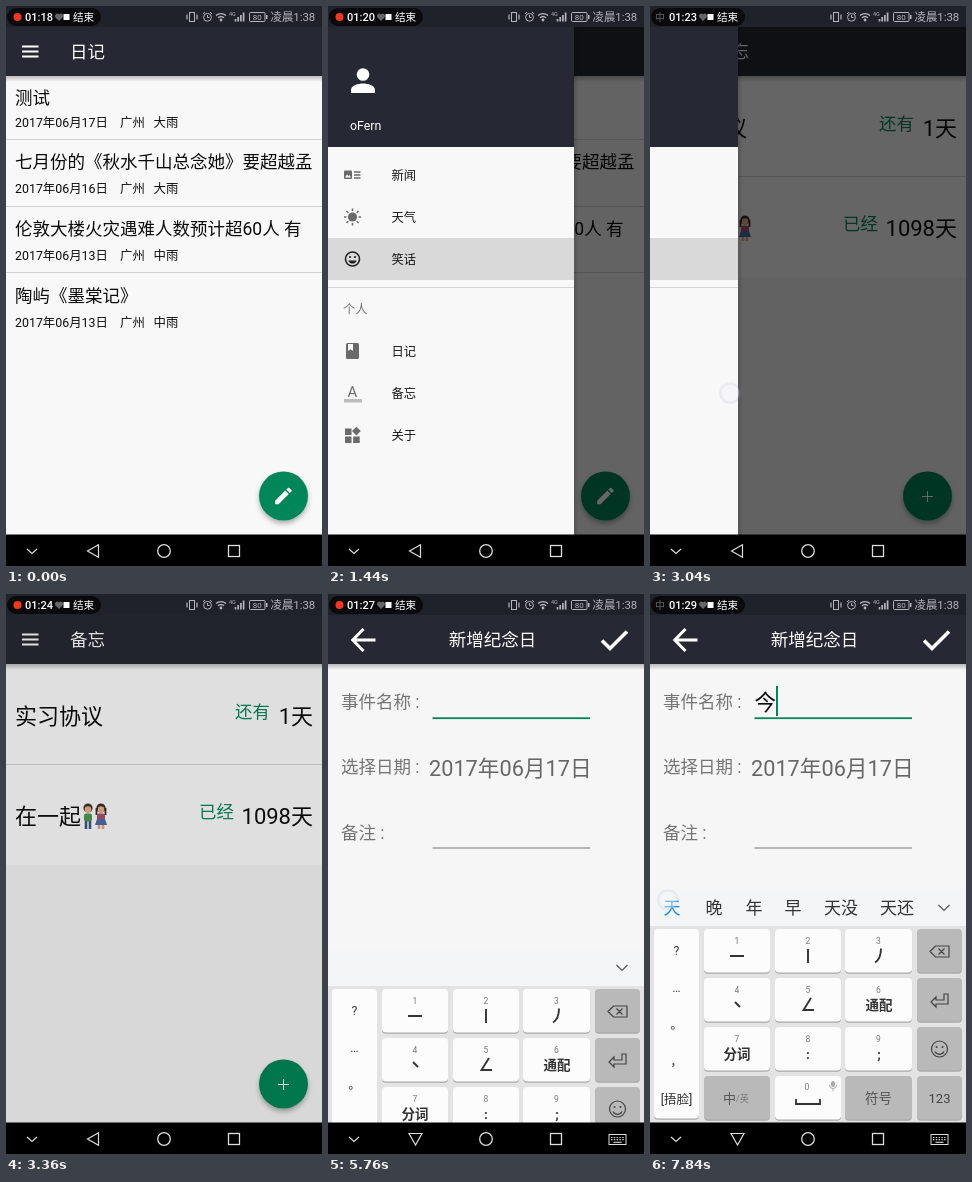
An HTML page for the animation above (8 s loop, 316 px wide and 560 px high).

```html
<!DOCTYPE html>
<html lang="zh-CN">
<head>
<meta charset="utf-8">
<title>日记</title>
<style>
html, body { margin: 0; width: 100%; height: 100%; overflow: hidden; background: #000; }
svg { display: block; width: 316px; height: 560px; }
text { font-family: Roboto, "Noto Sans CJK SC", "Noto Sans CJK", sans-serif; white-space: pre; }
</style>
</head>
<body>
<svg id="stage" viewBox="0 0 316 560" xmlns="http://www.w3.org/2000/svg"></svg>
<script>
const LOOP = 8000, STEP = 160;
const DARK = '#262833', GREEN = '#008659', GREY = '#757575', INK = '#0c0c0c';
const MEDIUM = 'font-weight="500"';

// ---- markup helpers; text y is the middle of the line ----
const text = (x, y, size, str, fill = INK, anchor = 'start', more = '') =>
  `<text x="${x}" y="${y + size * 0.37}" font-size="${size}" fill="${fill}" text-anchor="${anchor}" ${more}>${str}</text>`;
const mid = (x, y, size, str, fill, more) => text(x, y, size, str, fill, 'middle', more);
const rect = (x, y, w, h, fill, more = '') =>
  `<rect x="${x}" y="${y}" width="${w}" height="${h}" fill="${fill}" ${more}/>`;
const disc = (x, y, r, fill, more = '') => `<circle cx="${x}" cy="${y}" r="${r}" fill="${fill}" ${more}/>`;
const line = (d, color, width = 1, more = '') =>
  `<path d="${d}" fill="none" stroke="${color}" stroke-width="${width}" ${more}/>`;
const shape = (d, fill, more = '') => `<path d="${d}" fill="${fill}" ${more}/>`;
const group = (id, body, more = '') => `<g id="${id}" ${more}>${body}</g>`;

const bar = (title, x, anchor) =>
  rect(0, 70, 316, 6, 'url(#fall)') + rect(0, 21, 316, 49, DARK) + text(x, 46, 17.5, title, '#fff', anchor, MEDIUM);
const burger = line('M16 40.5H32.5M16 45.5H32.5M16 50.5H32.5', '#fff', 1.9);
const fab = icon => disc(277.5, 490, 24.5, GREEN, 'filter="url(#lift)"') + icon;
const PEN = 'M3 17.25V21h3.75L17.81 9.94l-3.75-3.75L3 17.25zM20.71 7.04c.39-.39.39-1.02 0-1.41l-2.34-2.34c-.39-.39-1.02-.39-1.41 0l-1.83 1.83 3.75 3.75 1.83-1.83z';

// ---- pages ----
function diary() {
  const rows = [
    ['测试', 91.5, '17', '大雨'],
    ['七月份的《秋水千山总念她》要超越孟', 156, '16', '大雨'],
    ['伦敦大楼火灾遇难人数预计超60人 有', 222.7, '13', '中雨'],
    ['陶屿《墨棠记》', 289.4, '13', '中雨']
  ];
  return rect(0, 21, 316, 508, '#f8f8f8') + rows.map(([title, top, day, sky], i) => {
    const y = 116 + i * 66.7;
    return text(9, top, 17.5, title) +
      text(9, y, 12.4, `2017年06月${day}日`) + text(114, y, 12.4, '广州') + text(147.5, y, 12.4, sky) +
      (i < 3 ? rect(0, Math.round(y + 17), 316, 1, '#d2d2d2') : '');
  }).join('') + bar('日记', 64) + burger +
    fab(shape(PEN, '#fff', 'transform="translate(266.4 478.9) scale(.92)"'));
}

function couple() {
  const one = (x, hair, top, legs) =>
    disc(x, 214, 4.6, hair) + disc(x, 215.5, 3.3, '#e8b48c') + rect(x - 4, 219.5, 8, 8, top, 'rx="2"') +
    line(`M${x - 2} 227V235M${x + 2} 227V235`, legs, 2.6);
  return one(82, '#4a3226', '#4f9a55', '#3c5a86') + one(95, '#3a2a26', '#b0506a', '#e0aa88') +
    shape('M91 225H99L101 231H89Z', '#4c6ea8') + line('M90.5 214V221M99.5 214V221', '#3a2a26', 1.8);
}

const memo = () =>
  rect(0, 21, 316, 508, '#f6f6f6') + rect(0, 70, 316, 201, '#fefefe') + rect(0, 170, 316, 1, '#d8d8d8') +
  text(9, 122, 22, '实习协议') + text(229, 118, 17.4, '还有', GREEN) + text(307, 122, 22, '1天', INK, 'end') +
  text(9, 222, 22, '在一起') + couple() + text(193, 218, 17.4, '已经', GREEN) + text(307, 222, 22, '1098天', INK, 'end') +
  bar('备忘', 64) + burger + fab(line('M272 490.5H283M277.5 485V496', '#fff', 1));

function drawer() {
  const G = '#6a6a6a';
  const icons = [
    rect(16, 164.5, 8, 8.5, G, 'rx="1"') + shape('M17 171.5L19 168.5L20.5 170L21.5 169L23 171.5Z', '#f8f8f8') +
      line('M26 166H32.5M26 169H32.5M26 172H32.5', G, 1.7),
    disc(24.5, 211, 4.6, G) + line('M24.5 202.5V205M24.5 217V219.5M16 211H18.5M30.5 211H33M18.5 205L20.2 206.7M28.8 215.3L30.5 217M30.5 205L28.8 206.7M20.2 215.3L18.5 217', G, 1.6),
    disc(24.5, 253, 7, 'none', 'stroke="#222" stroke-width="1.6"') + disc(22, 251, 1.1, '#222') + disc(27, 251, 1.1, '#222') +
      shape('M20.3 254.5H28.7A4.4 4.4 0 0 1 20.3 254.5Z', '#222'),
    rect(18, 337, 13, 16, G, 'rx="1.5"') + shape('M20 338H25V345L22.5 343.3L20 345Z', '#f8f8f8'),
    mid(24.5, 385, 15, 'A', G) + rect(16, 393, 18, 3.5, '#bdbdbd'),
    rect(17, 422.5, 6.5, 6.5, G) + rect(17, 430.5, 6.5, 6.5, G) + rect(25.2, 430.5, 6.5, 6.5, G) +
      rect(25.3, 422, 6.2, 6.2, G, 'transform="rotate(45 28.4 425.1)"')
  ];
  const items = [['新闻', 169], ['天气', 211], ['笑话', 253], ['日记', 345], ['备忘', 387], ['关于', 429]];
  return rect(246, 21, 5, 508, 'url(#side)') + rect(0, 21, 246, 508, '#f8f8f8') + rect(0, 21, 246, 120, DARK) +
    disc(35, 68.5, 6.3, '#fff') + shape('M23 87V84C23 79.5 30 77.5 35 77.5S47 79.5 47 84V87Z', '#fff') +
    text(22, 119, 12.4, 'oFern', '#fff') +
    rect(0, 232, 246, 42, '#d9d9d9') + rect(0, 281, 246, 1, '#d4d4d4') + text(15, 303, 12.3, '个人', GREY) +
    items.map(([name, y], i) => icons[i] + text(63.5, y, 12.3, name, '#151515', 'start', MEDIUM)).join('');
}

const form = () =>
  rect(0, 21, 316, 508, '#f6f6f6') + bar('新增纪念日', 164.5, 'middle') +
  line('M47.5 46H26M35.5 35L24.8 46L35.5 57', '#fff', 3) +
  line('M274 46.5L282 54.5L299 37.5', '#fff', 3.6) +
  text(13, 108, 17.5, '事件名称 :', GREY) + text(13, 173, 17.5, '选择日期 :', GREY) + text(13, 239, 17.5, '备注 :', GREY) +
  text(101, 174, 21.7, '2017年06月17日', '#666') +
  rect(104.5, 123.3, 157.5, 1.8, GREEN) + rect(104.5, 253.5, 157.5, 1, '#777') +
  group('typed', text(104.5, 108, 21.5, '今')) + group('caret', rect(0, 92, 2, 30, GREEN));

// ---- keyboard ----
const COLS = [[54, 66], [125, 66], [195, 67], [267, 45]], ROWS = [335, 384, 433, 482];
function keys() {
  const cap = (x, y, w, h, fill) =>
    rect(x, y + 1.3, w, h, '#a9a9a9', 'rx="4"') + rect(x, y, w, h, fill, 'rx="4"');
  const K = '#333', LIGHT = '#fcfcfc', SOFT = '#b9b9b9';
  let out = rect(0, 296, 316, 36, '#f4f5f7') + rect(0, 332, 316, 197, '#e3e3e4') + cap(4, 335, 45, 189.5, LIGHT);
  [['?', 356], ['…', 393], ['。', 430], ['，', 467], ['[捂脸]', 505]].forEach(([s, y]) => out += mid(26.5, y, 12.5, s, K));
  ROWS.forEach((y, r) => COLS.forEach(([x, w], c) => {
    const soft = c === 3 || (r === 3 && c !== 1);
    out += cap(x, y, w, 43.5, soft ? SOFT : LIGHT);
    if (c < 3 && r < 3) out += mid(x + w / 2, y + 11.5, 8.5, r * 3 + c + 1, '#777');
  }));
  const word = (x, y, s) => mid(x, y, 13.5, s, K, 'font-weight="700"');
  out += line('M80 362H94M158 355V369M231 354.5C231 361 229 366 225 368.5M85 408L90 413M161 404L153.5 416H164', K, 1.9) +
    word(229, 411, '通配') + word(87, 460, '分词') + word(158, 460, ':') + word(229, 460, ';') +
    text(73, 504, 13, '中', '#555') + text(86, 505, 9, '/英', '#777') +
    mid(157, 492.5, 8.5, '0', '#777') + line('M146 505V510H170V505', K, 1.8) +
    rect(181, 487, 4, 6, '#aaa', 'rx="2"') + line('M179.5 491A3.5 3.5 0 0 0 186.5 491M183 494.5V497', '#aaa') +
    mid(228.5, 504, 13.5, '符号', '#555') + mid(289.5, 504, 13, '123', '#444') +
    line('M280 357.5L285.5 352H299V363H285.5ZM288.5 354.5L294.5 360.5M294.5 354.5L288.5 360.5', '#444', 1.2) +
    line('M286 403L281 408L286 413V410H298V400H294V406H286Z', '#444', 1.2) +
    group('clear', mid(289.5, 455, 14, '清空', '#444')) +
    group('smile', disc(289.5, 455, 8, 'none', 'stroke="#444" stroke-width="1.2"') + disc(286.5, 453, 1, '#444') +
      disc(292.5, 453, 1, '#444') + line('M285 457.5A5 5 0 0 0 294 457.5', '#444', 1.2));
  return out + group('words', '') +
    group('tag', rect(0, 273, 30, 23, '#747474') + `<text id="strokes" x="5" y="290" font-size="15" fill="#fff"></text>` +
      shape(PEN, '#8a8a8a', 'stroke="#fff" stroke-width="1.5" paint-order="stroke"'));
}

// ---- system bars ----
function system() {
  const S = '#b4b5bb';
  return rect(0, 0, 316, 21, '#20222b') + rect(1, 2, 94, 18, '#0a0a0c', 'rx="9"') +
    group('faint', text(5, 11, 10, '中', '#666')) + group('rec', disc(11.5, 11, 4, '#f4371f')) +
    `<text id="clock" x="19" y="15" font-size="11" fill="#fff" ${MEDIUM}></text>` +
    shape('M53 15L49.5 11.5A2.3 2.3 0 0 1 53 8.5A2.3 2.3 0 0 1 56.5 11.5Z', '#666') +
    rect(57.5, 8, 6, 6, '#fff') + text(67, 11, 10.6, '结束', '#fff', 'start', MEDIUM) +
    rect(183.5, 6.5, 5, 9, 'none', `stroke="${S}"`) + line('M181 8.5V13.5M191 8.5V13.5', S, 1.2) +
    disc(201.5, 11.3, 3.9, 'none', `stroke="${S}"`) + line('M201.5 9V11.5H203.5M197 8L199 6M206 8L204 6', S) +
    line('M210 9.5A7.5 7.5 0 0 1 220 9.5M212 11.8A4.5 4.5 0 0 1 218 11.8', S, 1.3) + disc(215, 14, 1.4, S) +
    text(223, 8, 5.5, '4G', S) + line('M229.5 15.5V13M232.2 15.5V11M234.9 15.5V9M237.6 15.5V6.5', S, 1.7) +
    rect(243.5, 6.5, 15.5, 9, 'none', `stroke="${S}" rx="1"`) + rect(260, 9, 1.5, 4, S) + mid(251.2, 11, 8, '80', S) +
    text(264.5, 11, 11.4, '凌晨1:38', S) +
    rect(0, 528.5, 316, 31.5, '#000') + line('M21 543L26 547.5L31 543', '#ddd', 1.2) +
    group('back', line('M81.5 545L92.5 538.8V551.2Z', '#ddd', 1.2)) +
    group('down', line('M87.5 551L81 539.5H94Z', '#ddd', 1.2) + rect(281, 540.5, 17, 10, 'none', 'stroke="#ddd"') +
      line('M283 543.5H296M283 545.7H296', '#ddd', 1.2, 'stroke-dasharray="1.4 1.4"') + line('M285.5 548.3H293.5', '#ddd', 1.1)) +
    disc(158, 545, 6.3, 'none', 'stroke="#ddd" stroke-width="1.3"') + rect(222.5, 539.5, 11, 11, 'none', 'stroke="#ddd" stroke-width="1.3"');
}

const fade = (id, axis, a, b) =>
  `<linearGradient id="${id}" x2="${axis === 'x' ? 1 : 0}" y2="${axis === 'y' ? 1 : 0}"><stop stop-opacity="${a}"/><stop offset="1" stop-opacity="${b}"/></linearGradient>`;
const stage = document.getElementById('stage');
stage.innerHTML = '<defs>' + fade('fall', 'y', .25, 0) + fade('side', 'x', .15, 0) +
  '<filter id="lift" x="-30%" y="-30%" width="160%" height="170%"><feDropShadow dx="0" dy="3" stdDeviation="2.5" flood-opacity=".3"/></filter></defs>' +
  group('diary', diary()) + group('memo', memo()) + group('scrim', rect(0, 21, 316, 508, '#000')) +
  group('drawer', drawer()) + group('form', form()) + group('board', keys()) + system() +
  group('touch', disc(0, 0, 11, '#8fa0c0', 'opacity=".3"') + disc(0, 0, 9, '#f4f5f8', 'stroke="#c9cedb" stroke-width=".8"'));

// ---- timing ----
const el = {};
stage.querySelectorAll('[id]').forEach(n => el[n.id] = n);
const show = (id, on) => el[id].style.display = on ? '' : 'none';
const move = (id, x, y = 0) => el[id].setAttribute('transform', `translate(${x} ${y})`);

function tween(keys, t) {
  const i = keys.findIndex(k => k[0] > t);
  if (i === 0) return keys[0][1];
  if (i < 0) return keys[keys.length - 1][1];
  const [t0, a] = keys[i - 1], [t1, b] = keys[i];
  return a + (b - a) * (t - t0) / (t1 - t0);
}
const passed = (times, t) => times.filter(x => x <= t).length;

const TICKS = [320, 960, 1600, 1920, 2400, 3200, 4000, 4640, 5760, 6720, 7520];
const BLINKS = [320, 960, 1600, 2240, 2720, 3360, 3840, 4160, 4480, 4960, 5440, 5760, 6080, 6400, 6880, 7200, 7520];
const DRAWER = [[160, 0], [320, 14], [480, 42], [640, 81], [800, 140], [960, 205], [1120, 246],
  [2560, 246], [2720, 230], [2880, 165], [3040, 88], [3200, 25], [3360, 0]];
const SCRIM = [[3040, .6], [3200, .35], [3360, .12], [3520, 0]];
const FORM = [[4000, 316], [4160, 250], [4320, 150], [4480, 70], [4640, 23], [4800, 6], [4960, 0]];
const BOARD = [[5440, 233], [5600, 170], [5760, 60], [5920, 0]];
// start, hold until, gone at, x, y
const TAPS = [[160, 960, 1120, 0, 387], [2240, 2720, 3360, 80, 387], [3680, 4160, 4600, 277, 487],
  [5280, 5440, 5760, 180, 110], [6400, 6560, 6700, 208, 363], [6720, 6720, 6860, 87, 410],
  [6880, 6880, 7020, 87, 410], [7040, 7200, 7340, 158, 410], [7360, 7600, 8080, 18, 306]];
const STROKES = [6400, 6720, 6880, 7040], PICK = 7520;
const WORDS = [
  [['的', 22], ['我', 64], ['你', 104], ['个', 143], ['会', 182], ['他', 221], ['看', 259]],
  [['今', 22], ['会', 64], ['个', 104], ['全', 143], ['合', 182], ['令', 221], ['余', 259]],
  [['天', 22], ['晚', 64], ['年', 104], ['早', 143], ['天没', 191], ['天还', 247]]
];
const ARROW = { next: 'M291 308L297 314L291 320', fold: 'M288.5 311L294 316.5L299.5 311' };

let wordsKey = null;
function setWords(n) {
  if (n === wordsKey) return;
  wordsKey = n;
  const list = n < 0 ? [] : WORDS[n];
  el.words.innerHTML = list.map(([s, x], i) => mid(x, 314, 17, s, i ? '#333' : '#1687e8')).join('') +
    line(n === 0 || n === 1 ? ARROW.next : ARROW.fold, '#555', 1.2);
}

function draw(t) {
  el.clock.textContent = '01:' + (18 + passed(TICKS, t));
  const rec = passed(BLINKS, t) % 2 === 0;
  show('rec', rec);
  show('faint', !rec);

  const open = tween(DRAWER, t);
  show('diary', t < 2560);
  show('memo', t >= 2560);
  el.scrim.setAttribute('opacity', t < 2000 ? open / 246 * .6 : tween(SCRIM, t));
  move('drawer', open - 246);
  show('drawer', open > 0);

  show('form', t > 4000);
  move('form', tween(FORM, t));
  const done = t >= PICK;
  show('typed', done);
  move('caret', done ? 126 : 104.5);
  show('caret', done || Math.floor((t - 4480) / 360) % 2 === 0);

  const up = t >= 5600;
  show('board', up);
  move('board', 0, tween(BOARD, t));
  show('back', !up);
  show('down', up);
  const count = done ? 0 : passed(STROKES, t);
  const tagWidth = 15 + 15 * Math.max(count, 1);
  show('tag', count);
  show('clear', count);
  show('smile', !count);
  el.strokes.textContent = '丿丶丶乛'.slice(0, count);
  el.tag.firstChild.setAttribute('width', tagWidth);
  el.tag.lastChild.setAttribute('transform', `translate(${tagWidth - 11} 268) scale(.5)`);
  setWords(done ? 2 : count === 0 ? -1 : count === 1 ? 0 : 1);

  const tap = TAPS.find(k => t >= k[0] && t < k[2]);
  show('touch', tap);
  if (tap) {
    const [, hold, end, x, y] = tap;
    move('touch', x || open + 16.5, y);
    el.touch.setAttribute('opacity', tween([[hold, .85], [end, 0]], t));
  }
}

const start = performance.now();
function tick() {
  const t = (performance.now() - start) % LOOP;
  draw(Math.floor(t / STEP) * STEP);
  requestAnimationFrame(tick);
}
tick();
</script>
</body>
</html>
```
